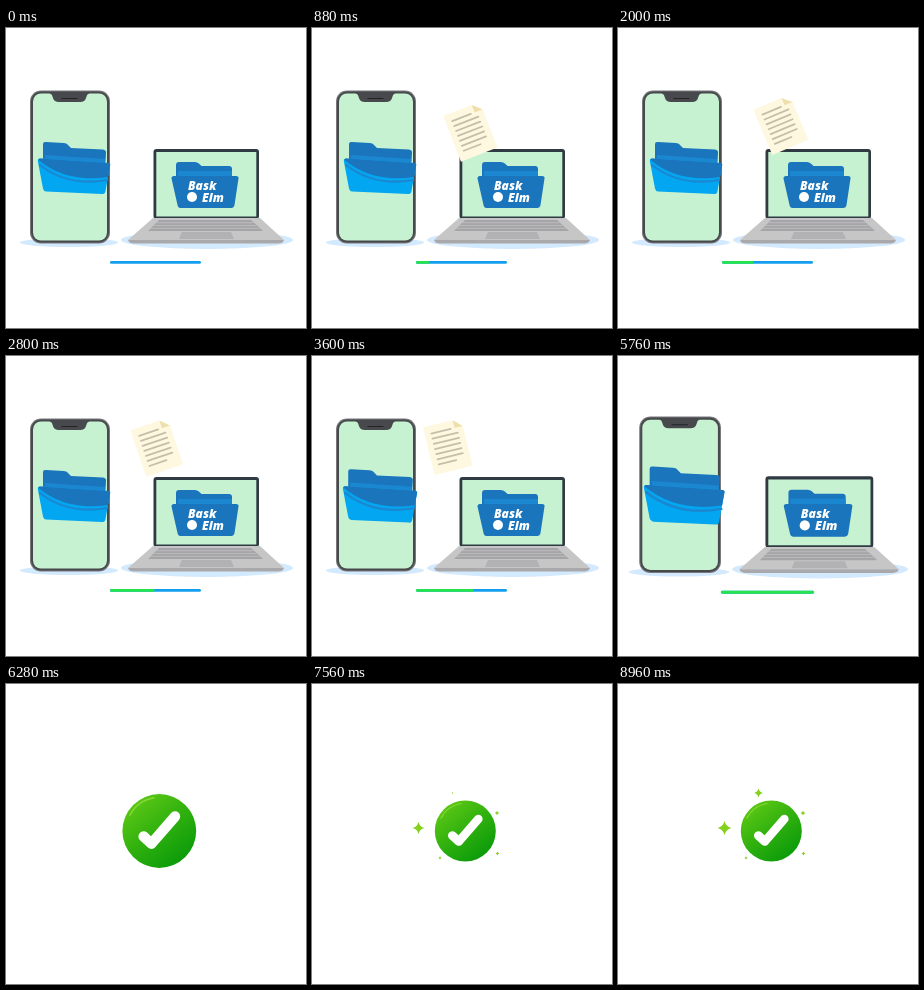
Write an HTML page with a canvas that moves like this. It is 300 by 300 pixels and loops after 9000 ms.

```html
<!DOCTYPE html>
<html lang="en">
<head>
<meta charset="utf-8">
<title>Document transfer</title>
<style>
html, body { margin: 0; width: 100%; height: 100%; overflow: hidden; background: #fff; }
canvas { display: block; width: 100vw; height: 100vh; }
</style>
</head>
<body>
<canvas id="stage" width="300" height="300"></canvas>
<script>
const ctx = document.getElementById('stage').getContext('2d');
const LOOP = 9000;
const FLIGHT = 880;
const DEEP = '#1b75bc', MID = '#1b87d1', BRIGHT = '#03a6f0';
// [take-off time, height of the arc's top]
const flights = [[280, 91], [1370, 79], [2250, 85], [3150, 90], [4110, 87]];
// [x, y, radius, first appearance, twinkle period]
const sparkles = [
  [106.5, 144, 7, 6480, 1600],
  [140.5, 109, 5, 7400, 2400],
  [185, 129, 2.6, 6600, 1500],
  [185.5, 169.5, 2, 6800, 1500],
  [128, 174, 1.8, 7000, 1400]
];

const clamp = v => Math.max(0, Math.min(1, v));
const ramp = (t, a, b) => clamp((t - a) / (b - a));
const smooth = (t, a, b) => { const u = ramp(t, a, b); return u * u * (3 - 2 * u); };
const mix = (a, b, u) => a + (b - a) * u;

function fill(d, color) {
  ctx.fillStyle = color;
  ctx.fill(new Path2D(d));
}

function stroke(d, color, width) {
  ctx.strokeStyle = color;
  ctx.lineWidth = width;
  ctx.lineCap = ctx.lineJoin = 'round';
  ctx.stroke(new Path2D(d));
}

function box(x, y, w, h, r, color) {
  ctx.beginPath();
  ctx.roundRect(x, y, w, h, r);
  ctx.fillStyle = color;
  ctx.fill();
}

function oval(x, y, rx, ry, color) {
  ctx.beginPath();
  ctx.ellipse(x, y, rx, ry, 0, 0, 7);
  ctx.fillStyle = color;
  ctx.fill();
}

function scaled(x, y, s, draw) {
  ctx.save();
  ctx.translate(x, y);
  ctx.scale(s, s);
  ctx.translate(-x, -y);
  draw();
  ctx.restore();
}

function phone() {
  oval(63, 214.5, 49, 4.5, '#d3e9fd');
  box(24, 62.5, 80, 153, 11, '#77787a');
  box(25, 63.5, 78, 151, 10, '#48494c');
  box(27, 65.5, 74, 147, 8, '#c6f2d1');
  fill('M43 64.5H84Q81 66 80 70Q79 74 74 74H53Q48 74 47 70Q46 66 43 64.5Z', '#48494c');
  stroke('M56 70.5H71', '#222326', 1.2);
}

function laptop() {
  oval(201, 212, 86, 9, '#d3e9fd');
  box(147.5, 121, 105.5, 70, 3, '#2f3a43');
  box(150.3, 124, 100, 64.5, 0, '#c6f2d1');
  fill('M147 190H254L278 212H122Z', '#c6c6c7');
  fill('M153 192H245L257 203H142Z', '#a5a5a8');
  for (let i = 0; i < 3; i++) {
    const y = 194.7 + i * 2.8;
    stroke(`M${151 - i * 3} ${y}H${247 + i * 3}`, '#c0c0c2', 0.8);
  }
  fill('M176 204H225L228 211H173Z', '#b2b2b4');
  fill('M122 212H278Q277 215.5 272 215.5H128Q123 215.5 122 212Z', '#a9a9ab');
}

function phoneFolderBack() {
  fill('M37 116Q37 113.5 40 114L58 115Q61 115 63 118L65 120L97 121.5Q100.5 122 100 125L99 142L37 138Z', DEEP);
  fill('M39 127L99 131V140L39 136Z', MID);
}

function phoneFolderFront() {
  fill('M34 130.5L102 135Q105 135.3 104 138L99.5 163Q99 166.5 96 166L40 163.5Q37.5 163 37 160.5L31.8 133Q31.5 130.3 34 130.5Z', BRIGHT);
  fill('M34 130.5L102 135Q105 135.3 104 138L102 149Q60 155 32.5 132Q32.3 130.4 34 130.5Z', DEEP);
  stroke('M34 137Q62 159 101.3 152', MID, 2.2);
}

function laptopFolderBack() {
  fill('M170 137Q170 134 173 134H189Q192 134 194 136.5L195.5 138H223Q226 138 226 141V155H170Z', DEEP);
  fill('M172 143H226V155H172Z', MID);
}

function laptopFolderFront() {
  fill('M168 148H230Q233 148 232.5 150.5L228.5 177Q228 180 225 180H174.5Q172 180 171.5 177L165.5 150.5Q165.3 148 168 148Z', DEEP);
  ctx.fillStyle = '#fff';
  ctx.font = 'italic 800 12px "Open Sans", sans-serif';
  ctx.fillText('Bask', 182, 162);
  ctx.fillText('Elm', 196, 173.5);
  oval(186, 169, 5, 5, '#fff');
}

function sheet(t) {
  for (const [start, top] of flights) {
    const u = (t - start) / FLIGHT;
    if (u < 0 || u > 0.93) continue;
    const d = 2 * u - 1;
    const y = top + (u < 0.5 ? 142 - top : 92) * d * d;
    const size = Math.min(mix(0.5, 1, ramp(u, 0, 0.2)), mix(1, 0.4, ramp(u, 0.8, 0.93)));
    ctx.save();
    ctx.translate(68 + 132 * u, y);
    ctx.rotate((-13 - 45 * (u - 0.5)) * Math.PI / 180);
    ctx.scale(size, size);
    fill('M-19.5 -24H11L19.5 -16V25H-19.5Z', '#fef8e0');
    fill('M11 -24L19.5 -16H11Z', '#eee0ae');
    for (let i = 0; i < 7; i++) {
      stroke(`M-13 ${-16 + i * 5.3}H${i === 0 ? 7 : i === 6 ? 5 : 13}`, '#c5bfa9', 1.8);
    }
    ctx.restore();
  }
}

function folderOpen(t) {
  return Math.max(...flights.map(([start], i) => {
    const rise = smooth(t, start - 150, start + 150);
    const last = i === flights.length - 1;
    return last ? rise : rise * (1 - smooth(t, start + 250, start + 560));
  }));
}

function transfer(t) {
  const size = 1 + 0.09 * folderOpen(t);
  phone();
  laptop();
  scaled(68, 143, size, phoneFolderBack);
  laptopFolderBack();
  sheet(t);
  scaled(68, 143, size, phoneFolderFront);
  laptopFolderFront();
  box(104, 233, 91, 2.8, 1.4, '#149fee');
  const done = 91 * ramp(t, 60, 5650);
  if (done > 0) box(104, 233, done, 2.8, 1.4, '#24e34c');
}

function badge() {
  const shade = ctx.createLinearGradient(132, 122, 172, 174);
  shade.addColorStop(0, '#5cc715');
  shade.addColorStop(0.5, '#2fb00e');
  shade.addColorStop(1, '#0a9a0a');
  oval(153.3, 147, 30.5, 30.5, shade);
  stroke('M129 134Q135 122 149 119.5', '#86d936', 1.2);
  stroke('M140.3 151.5L146.8 157.5L166.3 135', '#fff', 8.6);
}

function sparkle([x, y, radius, start, period], t) {
  if (t < start) return;
  const r = radius * Math.abs(Math.sin(Math.PI * (t - start) / period));
  const k = r * 0.2;
  fill(`M${x} ${y - r}Q${x + k} ${y - k} ${x + r} ${y}Q${x + k} ${y + k} ${x} ${y + r}Q${x - k} ${y + k} ${x - r} ${y}Q${x - k} ${y - k} ${x} ${y - r}Z`, '#84d01c');
}

function render(t) {
  ctx.fillStyle = '#fff';
  ctx.fillRect(0, 0, 300, 300);
  const out = (1 + 0.085 * smooth(t, 5560, 5720)) * (1 - smooth(t, 5720, 6000));
  if (out > 0) scaled(150, 150, out, () => transfer(t));
  const pop = 1.21 * smooth(t, 5980, 6240) - 0.21 * smooth(t, 6290, 6440);
  if (pop > 0) scaled(153.3, 147, pop, badge);
  sparkles.forEach(s => sparkle(s, t));
}

function tick() {
  render(performance.now() % LOOP);
  requestAnimationFrame(tick);
}
tick();
</script>
</body>
</html>
```
